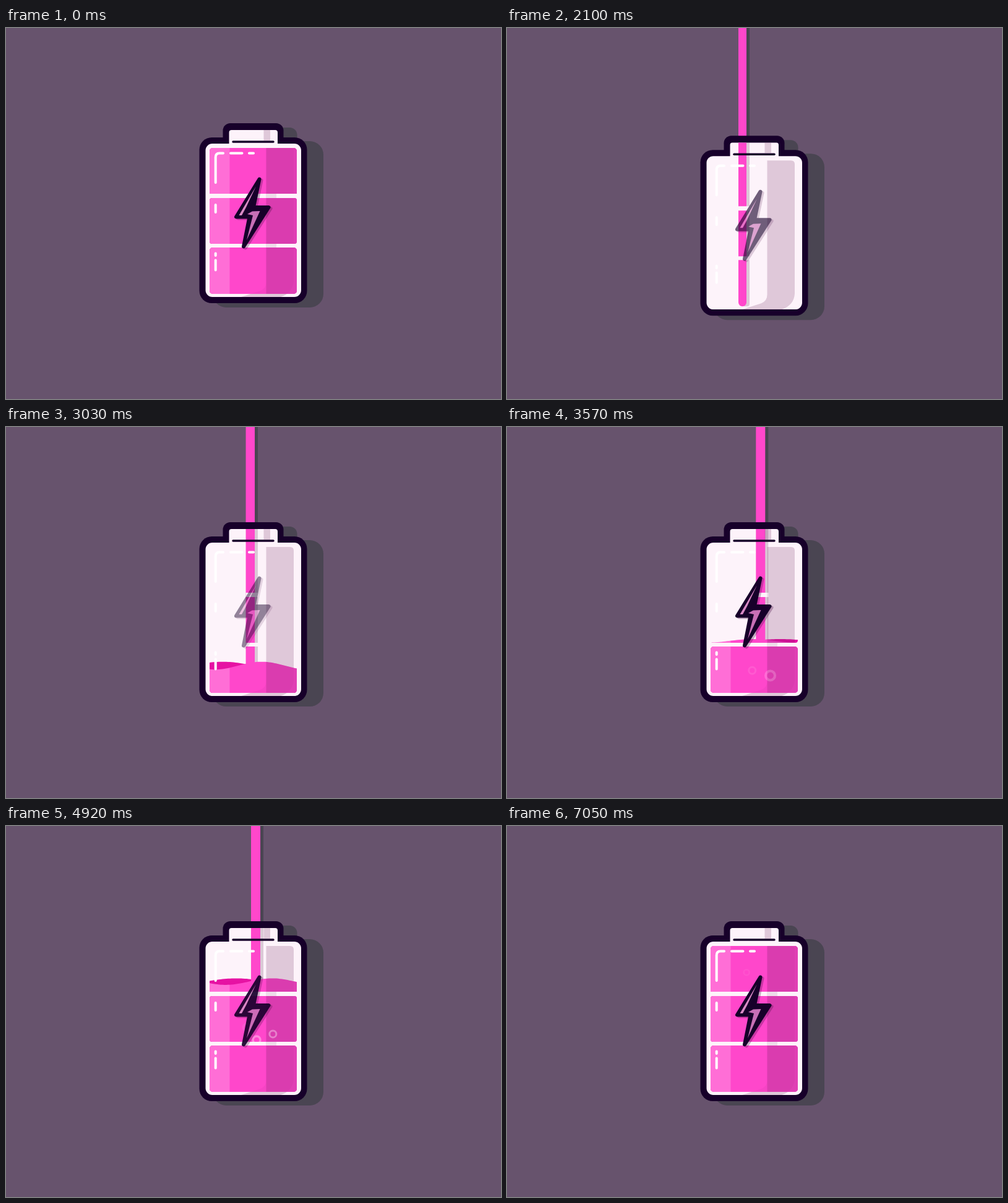
These frames come from a looping animation (800 px wide and 600 px high, 7.08 s). An HTML page:

```html
<!DOCTYPE html>
<html lang="en">
<head>
<meta charset="utf-8">
<title>Charging battery</title>
<style>
  html, body { margin: 0; width: 100%; height: 100%; overflow: hidden; background: #67536d; }
  svg { display: block; width: 100vw; height: 100vh; }
</style>
</head>
<body>
<svg viewBox="0 0 800 600" xmlns="http://www.w3.org/2000/svg">
  <defs>
    <path id="shade" d="M420.500 194H459Q465 194 465 200V409Q464 428 444 435H380L411 425Q420.500 421 420.500 411Z"/>
    <path id="bolt" d="M409.500 244.500L372 305.500H393.500L384 353.500L424.500 290H400Z" stroke-width="6" stroke-linejoin="round"/>
    <clipPath id="inside">
      <rect x="322.500" y="187" width="154.500" height="248" rx="11"/>
      <rect x="360.500" y="165" width="78.500" height="34" rx="4"/>
    </clipPath>
    <clipPath id="cells">
      <rect x="329" y="194" width="141" height="80" rx="5"/>
      <rect x="329" y="275" width="141" height="74" rx="4"/>
      <rect x="329" y="355" width="141" height="75" rx="5"/>
      <rect x="329" y="268" width="141" height="7"/>
    </clipPath>
    <clipPath id="frontClip"><path class="front"/></clipPath>
    <clipPath id="wet">
      <path class="front"/><path class="back"/>
      <rect class="jet"/><rect class="jetShade"/>
    </clipPath>
  </defs>

  <rect width="800" height="600" fill="#67536d"/>
  <g id="battery">
    <g fill="#4a4552">
      <rect x="334" y="183" width="179" height="269" rx="22"/>
      <rect x="373" y="161" width="97.500" height="60" rx="12"/>
      <rect class="jetShade"/>
    </g>
    <rect class="jet" fill="#ff47cb"/>

    <g fill="#17002a">
      <rect x="312.500" y="177" width="174" height="268" rx="20"/>
      <rect x="350.500" y="154" width="98" height="60" rx="12"/>
    </g>
    <rect x="312" y="150" width="175" height="300" fill="#fdf3fa" clip-path="url(#inside)"/>

    <g clip-path="url(#inside)">
      <rect class="jetShade" fill="#4a2045" opacity=".2"/>
      <g class="liquid" clip-path="url(#cells)"><path class="back" fill="#e612a3"/></g>
      <rect class="jet" fill="#ff47cb"/>
      <g fill="#671c55" fill-opacity=".2">
        <rect x="416.500" y="165" width="10.500" height="17"/>
        <use href="#shade"/>
      </g>
    </g>

    <g class="liquid">
      <g clip-path="url(#cells)">
        <g clip-path="url(#frontClip)">
          <rect x="329" y="180" width="141" height="260" fill="#ff47cb"/>
          <rect x="329" y="180" width="32.500" height="260" fill="#fff" opacity=".21"/>
          <rect x="420.500" y="180" width="50" height="260" fill="#671c55" opacity=".2"/>
          <use href="#shade" fill="#671c55" opacity=".05"/>
          <g id="bubbles" fill="none" stroke="#fff"></g>
        </g>
      </g>
      <g clip-path="url(#wet)">
        <path d="M329 268H470V275H329ZM329 349H470V355H329Z" fill="#fdf3fa"/>
        <path d="M420 268H437V275H420ZM420 349H437V355H420Z" fill="#eddde9"/>
      </g>
    </g>

    <path d="M367 184H432" stroke="#17002a" stroke-width="3.500" stroke-linecap="round"/>
    <path d="M338.700 250V209Q338.700 202.500 345 202.500H351M363 202.500H381.500M393 202.500H400M338.700 286V298M338.700 364.500V368M338.700 375.500V391.500"
      fill="none" stroke="#fff" stroke-width="4" stroke-linecap="round"/>

    <g id="boltGroup">
      <use href="#bolt" x="3" y="2" fill="#4a1048" stroke="#4a1048" opacity=".3"/>
      <use href="#bolt" fill="#17002a" stroke="#17002a"/>
      <path d="M404 256L376.500 303H381L388 290Z" fill="#d98ac6"/>
      <path d="M390 301L398 296.500L410.500 296L389 343L399 303Z" fill="#c86fb6"/>
    </g>
  </g>
</svg>
<script>
const LOOP = 7080, STEP = 30;
const $$ = s => [...document.querySelectorAll(s)];
const $ = s => document.querySelector(s);
const clamp = v => Math.max(0, Math.min(1, v));
const part = (t, a, b) => clamp((t - a) / (b - a));
const smooth = p => (1 - Math.cos(Math.PI * p)) / 2;
const set = (nodes, attrs) => nodes.forEach(n => {
  for (const k in attrs) n.setAttribute(k, attrs[k]);
});

// time, liquid level, wave height
const LEVELS = [
  [1900, 445, 0], [2580, 419, 9], [3570, 346, 3], [4200, 295, 6],
  [5670, 206.5, 4.5], [6700, 191, 4], [7050, 185, 0]
];
// time, middle of the jet
const SWAY = [[2180, 380.5], [4170, 417.5], [6150, 373]];
// x, y, birth, rise per ms, life, radius, opacity
const BUBBLES = [
  [425, 411, 3420, .06, 1500, 7.5, .4],
  [396, 397, 3500, .046, 1400, 5.500, .4],
  [430, 385, 4110, .06, 1500, 5.500, .35],
  [404, 370, 4600, .075, 1200, 6, .35],
  [389, 331, 4850, .075, 1400, 6, .35],
  [359, 310, 5100, .067, 1100, 5, .2],
  [387, 310, 5850, .061, 1260, 4.500, .3]
];

function track(rows, t, ease) {
  if (t <= rows[0][0]) return rows[0].slice(1);
  for (let i = 1; i < rows.length; i++) {
    const a = rows[i - 1], b = rows[i];
    if (t <= b[0]) {
      const p = ease(part(t, a[0], b[0]));
      return a.slice(1).map((v, k) => v + (b[k + 1] - v) * p);
    }
  }
  return rows[rows.length - 1].slice(1);
}

function wave(level, amp, crest, length) {
  let d = "M329 440";
  for (let x = 329; x <= 471; x += 3) {
    const y = level - amp * Math.cos(2 * Math.PI * (x - crest) / length);
    d += `L${x} ${y.toFixed(2)}`;
  }
  return d + "L471 440Z";
}

function boltAlpha(t) {
  if (t < 1200) return 1 - smooth(part(t, 660, 1170));
  if (t < 2370) return smooth(part(t, 1740, 2370));
  if (t > 5970) return 1;
  return .725 + .275 * Math.cos(2 * Math.PI * (t - 2370) / 1200);
}

function dip(t) {
  if (t < 1800) return 0;
  if (t < 1980) return 40 * Math.sin(Math.PI / 2 * part(t, 1800, 1980));
  return 40 * Math.exp((1980 - t) / 175);
}

const jets = $$(".jet"), jetShades = $$(".jetShade");
const fronts = $$(".front"), backs = $$(".back"), liquids = $$(".liquid");
const rings = BUBBLES.map(() => {
  const c = document.createElementNS("http://www.w3.org/2000/svg", "circle");
  $("#bubbles").append(c);
  return c;
});

function draw(t) {
  const drop = dip(t);
  $("#battery").setAttribute("transform", `translate(0 ${drop.toFixed(2)})`);
  $("#boltGroup").setAttribute("opacity", boltAlpha(t));

  const full = t < 1200;
  const [level, amp] = full ? [185, 0] : track(LEVELS, t, p => p);
  set(fronts, { d: wave(level, amp, 402 + .247 * (t - 4200), 150) });
  set(backs, { d: wave(level, amp, 316 - .2 * (t - 4200), 200) });
  set(liquids, { opacity: full ? 1 - smooth(part(t, 660, 1170)) : t < 1680 ? 0 : 1 });

  const [mid] = track(SWAY, t, smooth);
  const width = 13 + 2 * part(t, 2580, 3200);
  const fall = part(t, 1650, 1950), leave = part(t, 6050, 6350);
  const top = leave ? 200 * leave ** 1.5 : -60;
  const end = Math.min(fall * 430, Math.max(level + 12, 200), 430);
  const height = fall && leave < 1 ? Math.max(0, end - top) : 0;
  const visible = fall > 0 ? height : 0;
  set(jets, { x: mid - width / 2, y: top, width, height: visible, rx: width / 2 });
  set(jetShades, { x: mid, y: top, width: width / 2 + 5, height: visible, rx: 4 });

  BUBBLES.forEach(([x, y, birth, rise, life, r, alpha], i) => {
    const age = t - birth, p = age / life;
    const on = p > 0 && p < 1;
    set([rings[i]], {
      cx: x + 1.5 * Math.sin(age / 400), cy: y - rise * age, r,
      "stroke-width": r * .55,
      opacity: on ? alpha * Math.min(1, p * 5, (1 - p) * 4) : 0
    });
  });
}

const start = performance.now();
function tick() {
  const t = (performance.now() - start) % LOOP;
  draw(Math.floor(t / STEP) * STEP);
  requestAnimationFrame(tick);
}
draw(0);
requestAnimationFrame(tick);
</script>
</body>
</html>
```
